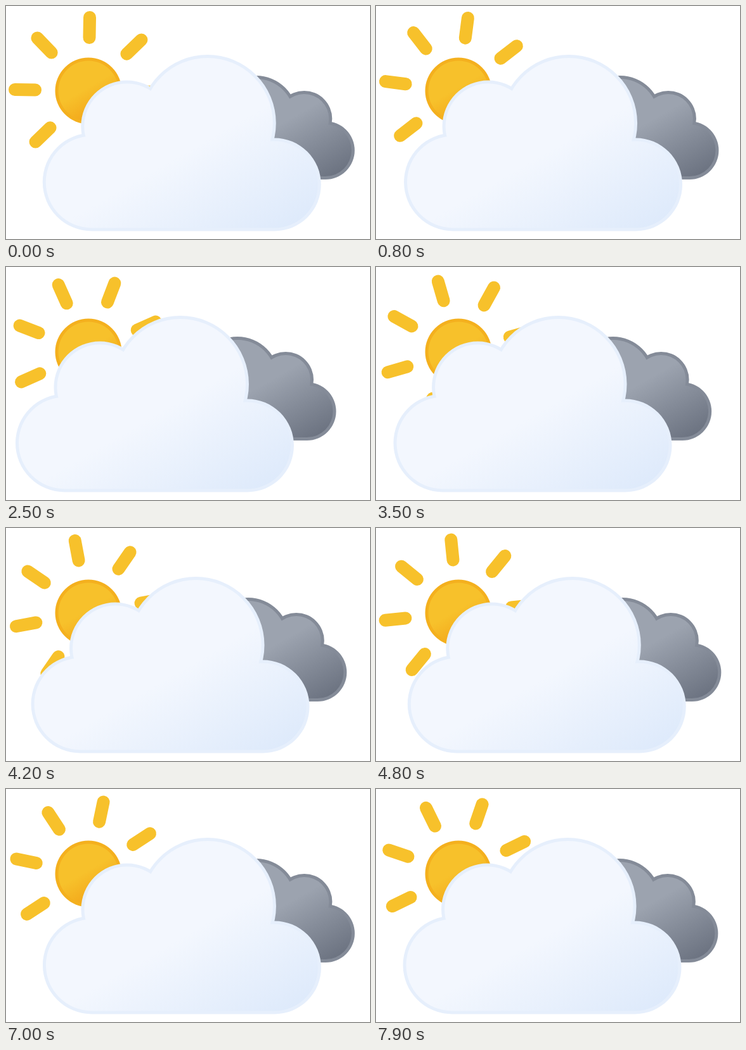
Recreate the animation shown at these times as an HTML page with a canvas. Size 574 by 368 pixels, loop 8 s.

```html
<!DOCTYPE html>
<html lang="en">
<head>
<meta charset="utf-8">
<title>Overcast day</title>
<style>
html, body { margin: 0; width: 100%; height: 100%; overflow: hidden; background: #fff; }
canvas { display: block; }
</style>
</head>
<body>
<canvas id="stage" width="574" height="368"></canvas>
<script>
const ctx = document.getElementById('stage').getContext('2d');
const LOOP = 8000, STEP = 100, BORDER = 5;
const SUN = { x: 130, y: 134, r: 52.5 };

// Clouds are unions of circles [x, y, r], listed left to right.
const front = {
  lobes: [[134.5, 278, 77.5], [190, 190, 72.5], [317, 185, 108], [422.5, 282, 73.5]],
  bottom: 355.5, edge: '#e6effc',
  fill: gradient(182, 115, 349, 405, '#f3f7fe', '#deeafb'),
  mid: -14.3, swing: 30
};
const back = {
  lobes: [[330, 230, 44], [394, 175, 65], [470, 178, 44], [503.5, 228, 46]],
  bottom: 274, edge: '#848b98',
  fill: gradient(354.5, 122.5, 459, 304, '#9ca3af', '#6b7280'),
  mid: -10, swing: 20.5
};
const sunFill = gradient(105, 91, 155, 177, '#f7c12b', '#f2a116');

function gradient(x1, y1, x2, y2, from, to) {
  const g = ctx.createLinearGradient(x1, y1, x2, y2);
  g.addColorStop(0, from);
  g.addColorStop(0.45, from);
  g.addColorStop(1, to);
  return g;
}

function disc(x, y, r, fill) {
  ctx.fillStyle = fill;
  ctx.beginPath();
  ctx.arc(x, y, r, 0, Math.PI * 2);
  ctx.fill();
}

function blob({ lobes, bottom }, inset, fill) {
  const first = lobes[0], last = lobes[lobes.length - 1];
  ctx.beginPath();
  ctx.moveTo(first[0], bottom - inset);
  for (const [x, y] of lobes) ctx.lineTo(x, y);
  ctx.lineTo(last[0], bottom - inset);
  ctx.closePath();
  for (const [x, y, r] of lobes) {
    ctx.moveTo(x + r - inset, y);
    ctx.arc(x, y, r - inset, 0, Math.PI * 2);
  }
  ctx.fillStyle = fill;
  ctx.fill();
}

// Triangle wave from -1 to 1, lowest at t = 2.633 s.
function drift(t) {
  const p = (((t - 2.633) / 7.01) % 1 + 1) % 1;
  return 1 - 4 * Math.abs(p - 0.5);
}

function drawCloud(cloud, t) {
  ctx.save();
  ctx.translate(cloud.mid + cloud.swing * drift(t), 0);
  blob(cloud, 0, cloud.edge);
  blob(cloud, BORDER, cloud.fill);
  ctx.restore();
}

function drawSun(t) {
  disc(SUN.x, SUN.y, SUN.r, '#f4b01e');
  disc(SUN.x, SUN.y, SUN.r - BORDER, sunFill);
  ctx.save();
  ctx.translate(SUN.x, SUN.y);
  ctx.rotate((1 + 7.96 * t) * Math.PI / 180);
  ctx.strokeStyle = '#f7c12b';
  ctx.lineWidth = 20;
  ctx.lineCap = 'round';
  for (let i = 0; i < 8; i++) {
    ctx.beginPath();
    ctx.moveTo(0, -84);
    ctx.lineTo(0, -116);
    ctx.stroke();
    ctx.rotate(Math.PI / 4);
  }
  ctx.restore();
}

function draw(ms) {
  const t = Math.floor((ms % LOOP) / STEP) * STEP / 1000;
  ctx.fillStyle = '#fff';
  ctx.fillRect(0, 0, 574, 368);
  drawSun(t);
  drawCloud(back, t);
  drawCloud(front, t);
}

const start = performance.now();
function tick() {
  draw(performance.now() - start);
  requestAnimationFrame(tick);
}
tick();
</script>
</body>
</html>
```
